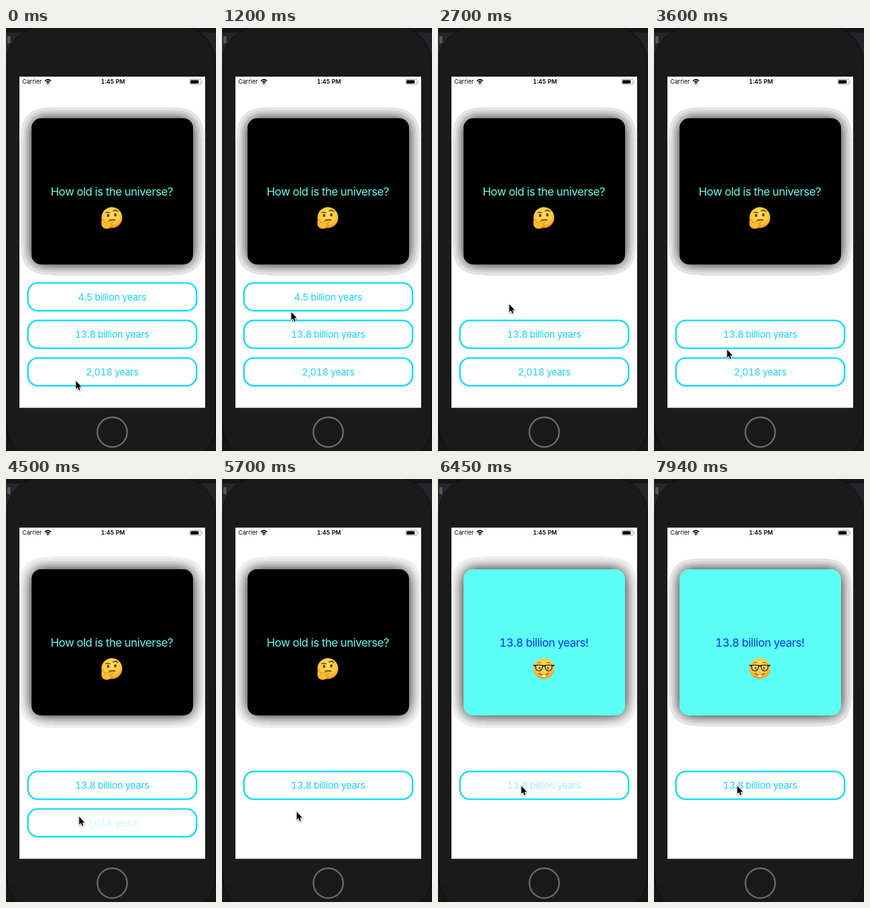
Animation of 329 by 661 pixels, one loop 8000 ms. Source, as an HTML page:

```html
<!DOCTYPE html>
<html lang="en">
<head>
<meta charset="utf-8">
<title>Quiz on a phone</title>
<style>
html, body { margin: 0; height: 100%; overflow: hidden; background: #161618; }
svg { display: block; width: 100%; height: 100%; }
text { font-family: Inter, Roboto, sans-serif; font-variant-numeric: tabular-nums; }
.mid { text-anchor: middle; }
.question { font-size: 17.6px; letter-spacing: -.025em; }
.answer text { font-size: 15.15px; letter-spacing: -.025em; fill: #18d6fc; }
.answer rect { fill: none; stroke: #00dcff; stroke-width: 2.4; }
.status { font-size: 9.3px; }
.line { fill: none; stroke-linecap: round; }
#cursor { filter: drop-shadow(0 1px 1px #0006); }
</style>
</head>
<body>
<svg viewBox="0 0 329 661">
  <defs>
    <radialGradient id="skin" cx=".5" cy=".35" r=".68">
      <stop offset="0" stop-color="#ffe15c"/>
      <stop offset=".6" stop-color="#fdc840"/>
      <stop offset="1" stop-color="#ea931c"/>
    </radialGradient>
    <filter id="glow" filterUnits="userSpaceOnUse" x="-10" y="90" width="349" height="330">
      <feGaussianBlur stdDeviation="12"/>
      <feComponentTransfer><feFuncA id="bands" type="discrete" tableValues="0 1"/></feComponentTransfer>
    </filter>
    <clipPath id="screen"><rect x="21" y="76" width="291" height="517.5"/></clipPath>
  </defs>

  <!-- phone -->
  <rect width="329" height="661" fill="#161618"/>
  <rect y="7" width="329" height="320" fill="#252528"/>
  <rect x="2" y="13" width="5" height="11" fill="#55554f"/>
  <rect x="1" y="-2" width="327" height="678" rx="55" fill="#1a1a1a" stroke="#0d0d0e"/>
  <circle cx="166.5" cy="631.5" r="23.3" fill="#191919" stroke="#6c6c6c" stroke-width="2.4"/>
  <rect x="21" y="76" width="291" height="517.5" fill="#fff"/>

  <!-- status bar -->
  <text class="status" x="25.6" y="87.3">Carrier</text>
  <path fill="none" stroke="#000" stroke-width="1.7" d="M60.8 82.7Q65.7 78.4 70.6 82.7M62.6 84.8Q65.7 82.2 68.8 84.8"/>
  <path d="M63.9 86.2Q65.7 84.9 67.5 86.2L65.7 88.2Z"/>
  <text class="status mid" x="167.5" y="87.3" font-weight="600">1:45 PM</text>
  <rect x="287.9" y="80.2" width="18" height="7.8" rx="2" fill="none" stroke="#888" stroke-width=".8"/>
  <rect x="289.2" y="81.5" width="12.6" height="5.2" rx="1"/>
  <path d="M307 82.6Q308.6 84.1 307 85.6Z" fill="#888"/>

  <!-- card -->
  <g clip-path="url(#screen)">
    <rect x="40" y="141" width="253" height="228.5" rx="15" filter="url(#glow)"/>
  </g>
  <rect id="card" x="40" y="141" width="253" height="228.5" rx="15"/>
  <text id="question" class="question mid" x="165.8" y="262"></text>

  <g transform="translate(165.8 296.3)">
    <circle r="16.3" fill="url(#skin)"/>
    <g id="thinking">
      <g fill="#5b3410"><ellipse cx="-5.8" cy="-3.6" rx="1.9" ry="2.5"/><ellipse cx="5.4" cy="-4.2" rx="1.9" ry="2.5"/></g>
      <path class="line" stroke="#6d4112" stroke-width="1.5" d="M-9.6-7.4Q-6-9-2.6-7.4M2-10.2Q5.8-13 9.4-9.4M-4.6 4.6Q.4 2.4 5 4"/>
      <path d="M-16 6C-16 2-13 2-12.4 5L-11.6 7.6L-2 5.6C4 4.4 4.6 7.4 1 8.6L-3.4 10C.4 10.4 .6 13 -1.6 15C-5 18-11 18-14 15C-16.4 12.6-16 9-16 6Z" fill="#fbbd37" stroke="#d98a17" stroke-width=".8"/>
    </g>
    <g id="nerd">
      <g id="half">
        <path class="line" d="M4.4-8.8Q7-10.4 10-8.6" stroke="#80501a" stroke-width="1.2"/>
        <ellipse cx="6.6" cy="-.8" rx="1.7" ry="2.3" fill="#5b3410"/>
        <path d="M1.8-5Q7-6.4 12.8-5Q13.4 3.6 7.6 3.6Q2.2 3.6 1.8-5Z" fill="#fff3b8" fill-opacity=".25" stroke="#1b1b1b" stroke-width="1.4"/>
        <path class="line" d="M0-4.4H2M12.6-4.6L15.8-4.8" stroke="#1b1b1b" stroke-width="1.8"/>
      </g>
      <use href="#half" transform="scale(-1 1)"/>
      <path class="line" d="M-7.4 7.4Q0 13 7.4 7.4" stroke="#7a4310" stroke-width="1.4"/>
      <path d="M-2.6 9.6H2.6V12.4Q0 13.4-2.6 12.4Z" fill="#fff"/>
    </g>
  </g>

  <g id="answers"></g>
  <g id="cursor">
    <path d="M.6 1V13.6L3.4 11L5.3 15.4L7.2 14.6L5.4 10.2H9.2Z" stroke="#fff" stroke-width="1.8" paint-order="stroke"/>
  </g>
</svg>
<script>
const LOOP = 8000, STEP = 150, SOLVED = 6450;
const $ = id => document.getElementById(id);

// pointer trips: start and end time, end point, sideways bow
const trips = [
  { from: 0, to: 1500, x: 110, y: 430.5, bow: -6 },
  { from: 2550, to: 2700, x: 111, y: 430.5, bow: 0 },
  { from: 3000, to: 3900, x: 114, y: 526.5, bow: 1 },
  { from: 5550, to: 6150, x: 130, y: 478.5, bow: 0 }
];

const answers = [
  { label: "4.5 billion years", press: 1650 },
  { label: "13.8 billion years", press: 6300, right: true },
  { label: "2,018 years", press: 4500 }
];

$("answers").innerHTML = answers.map(({ label }, i) => {
  const y = 398.4 + 58.6 * i;
  return `<g class="answer"><rect x="34.4" y="${y}" width="264.2" height="43.4" rx="15.5"/>
    <text class="mid" x="166.2" y="${y + 27.2}">${label}</text></g>`;
}).join("");
answers.forEach((a, i) => a.node = $("answers").children[i]);

const show = (node, on) => node.setAttribute("visibility", on ? "visible" : "hidden");
const bands = n => Array.from({ length: n }, (_, k) => k ? (k + .5) / n : 0).join(" ");
const coarse = bands(14), fine = bands(22);

// eased progress from 0 to 1 between two times
function ease(t, from, to) {
  const p = Math.min(1, Math.max(0, (t - from) / (to - from)));
  return p * p * (3 - 2 * p);
}

function pointer(t) {
  let x = 109, y = 550.5;
  for (const trip of trips) {
    const p = ease(t, trip.from, trip.to);
    x += (trip.x - x) * p + trip.bow * Math.sin(Math.PI * p);
    y += (trip.y - y) * p;
  }
  return `translate(${x} ${y})`;
}

function draw(t) {
  const now = Math.floor(t / STEP) * STEP;
  $("cursor").setAttribute("transform", pointer(now));

  for (const { node, press, right } of answers) {
    show(node, right || now < press + STEP);
    node.lastElementChild.setAttribute("opacity", now < press ? 1 : .2 + .8 * ease(now, press, press + 470));
  }

  const solved = t >= SOLVED;
  $("card").setAttribute("fill", solved ? "#5cfff5" : "#000");
  $("question").setAttribute("fill", solved ? "#0433ff" : "#5cfff0");
  $("question").textContent = solved ? "13.8 billion years!" : "How old is the universe?";
  show($("thinking"), !solved);
  show($("nerd"), solved);
  $("bands").setAttribute("tableValues", t >= 4500 && t < 7940 ? fine : coarse);
}

const start = performance.now();
function tick() {
  draw((performance.now() - start) % LOOP);
  requestAnimationFrame(tick);
}
tick();
</script>
</body>
</html>
```
